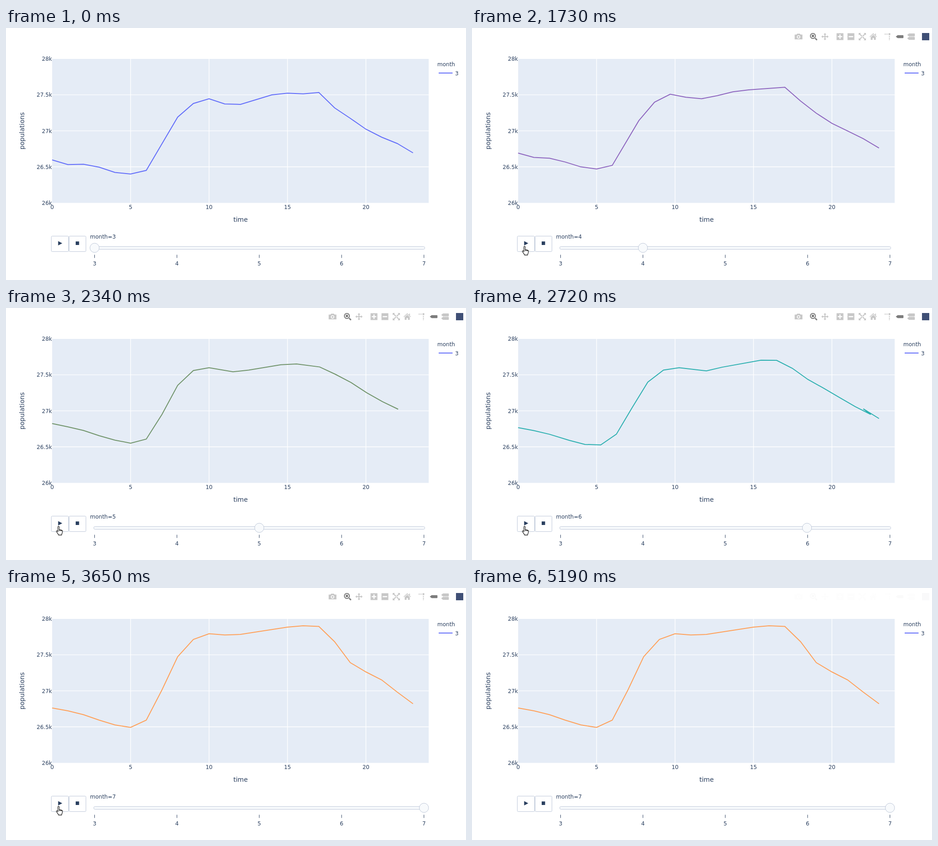
Write an HTML page that moves like this. It is 1010 px wide and 554 px high and loops after 6.43 s.

```html
<!DOCTYPE html>
<html lang="en">
<head>
<meta charset="utf-8">
<title>Populations by month</title>
<style>
  html, body { margin: 0; height: 100%; overflow: hidden; background: #fff; }
  svg { display: block; width: 1010px; height: 554px; }
  text { font: 12px "DejaVu Sans", sans-serif; fill: #2a3f5f; }
  .title { font-size: 14px; }
  .mid { text-anchor: middle; }
  .end { text-anchor: end; }
  .box { fill: #fff; stroke: #bec8d9; }
  .knob { fill: #f8fafc; stroke: #bec8d9; }
  .icon { fill: #c7c7c7; stroke: none; fill-rule: evenodd; }
  .icon.on { fill: #7c7c7c; }
</style>
</head>
<body>
<svg viewBox="0 0 1010 554">
  <rect x="101.3" y="68" width="826.8" height="316.5" fill="#e5ecf6"/>
  <g id="grid" stroke="#fff" stroke-width="1.4"></g>
  <path id="trace" fill="none" stroke-width="2" stroke-linejoin="miter" stroke-miterlimit="2"/>
  <g id="labels"></g>
  <text class="title mid" x="515" y="426">time</text>
  <text class="title mid" transform="translate(39.5 226) rotate(-90)">populations</text>
  <text x="947" y="83.5">month</text>
  <path d="M950 99h30.5" stroke="#636efa" stroke-width="2"/>
  <text x="986" y="104">3</text>

  <rect class="box" x="99.5" y="457.5" width="38" height="34" rx="2"/>
  <rect class="box" x="138.5" y="457.5" width="37" height="34" rx="2"/>
  <path d="M114.5 468.5l9 4.8-9 4.8zM153 469.3h7.5v7.7H153z" fill="#2a3f5f"/>

  <text id="current" x="184.5" y="463"></text>
  <rect class="knob" x="192.5" y="480.5" width="727" height="6" rx="3"/>
  <g id="steps"></g>
  <circle id="handle" class="knob" cy="483.3" r="10.2"/>

  <g id="modebar"></g>
  <path id="arrow" d="M0 0v16l3.8-3.6 2.6 6 2.3-1-2.6-5.8h5.4z" fill="#fff" stroke="#000"/>
  <path id="hand" d="M3.9 13V2.2a1.4 1.4 0 0 1 2.9 0V8.2l5.2 1.2q2 .5 2 2.6c0 3.8-1.6 4.6-1.9 8.1H5.3c-.3-2.4-2.4-4-4.5-7.1q-.6-1.9 1-2.2 1.2 0 2.1 2zM6.8 8v3.5m2.5-3v3m2.5-2.2v2.5"
    fill="#fff" stroke="#000" stroke-width="1.1" stroke-linejoin="round"/>
</svg>
<script>
const LOOP = 6430, FADE = 300;
const $ = id => document.getElementById(id);
const clamp = v => Math.min(1, Math.max(0, v));
const lerp = (a, b, k) => a + (b - a) * k;
const smooth = k => k * k * (3 - 2 * k);
const cubicInOut = k => k < .5 ? 4 * k ** 3 : 1 - 4 * (1 - k) ** 3;
const plotX = hour => 101.3 + 34.45 * hour;
const stepX = i => 194.5 + 180.8 * i;

// Heights in pixels, hour by hour; gaps are points left out of the simplified line.
const months = [
  { color: [99, 110, 250], ys: [290, 300.3, 299.6, 306, 317.5, 321, 313, , 196, 166, 155.5, 167,
    168, 157.5, 147, 143.3, 144.7, 141.7, 175.5, 198.5, 222.5, 240, 254, 274.5] },
  { color: [239, 85, 59], ys: [241, 249, 256.5, 269, 278, 285, 277, 221, 156.5, 123, 119, 127.5,
    129.3, 125.3, 119.5, , 106, 104.3, 127, 162, 180.5, 195.5, 219.7, 240] },
  { color: [0, 204, 150], ys: [265.6, 272.3, 280.7, 291.4, 301.6, 308.2, 298.3, 245.6, 182.4, 150.6, 142.4, ,
    151.9, 143, , , 124.2, 126.2, 150.9, 183.1, 197, 208.5, 228.9, 246.8] },
  { color: [171, 99, 250], ys: [255.4, 261.3, 269.1, , 289.8, 295.2, 281.2, 218.8, 145, 108.3, 97.1, 100.2,
    100, 94, 88.2, 83.7, 80.9, 84.6, 118.4, 163.5, 182.4, 198.6, 221.7, 243] },
  { color: [255, 161, 90], ys: [263.7, 270, 278.5, 290.5, 301, 306.5, 290.5, 224, 151, 113, 100.5, 103.3,
    102, , , 86, 83, 84.5, 118, 164, 184.5, 202, 229, 254.5] }
];
for (const m of months) {
  m.points = [];
  m.ys.forEach((y, hour) => m.points.push([plotX(hour), y])); // forEach skips the gaps
}
const starts = [1570, 2076, 2592, 3105];

// Static parts built by rule
const text = (cls, x, y, s) => `<text class="${cls}" x="${x}" y="${y}">${s}</text>`;
let grid = '', labels = '', steps = '';
for (let i = 0; i < 5; i++) {
  const x = plotX(5 * i), y = 384.5 - 79.2 * i;
  if (i) grid += `<path d="M${x} 68V384.5"/>`;
  if (i % 4) grid += `<path d="M101.3 ${y}H928.1"/>`;
  labels += text('mid', x, 398.3, 5 * i) + text('end', 101, y + 4.4, 26 + i / 2 + 'k');
  steps += `<path d="M${stepX(i)} 498.5v7" stroke="#2a3f5f"/>` + text('mid', stepX(i), 522.3, 3 + i);
}
$('grid').innerHTML = grid;
$('labels').innerHTML = labels;
$('steps').innerHTML = steps;

const arrowhead = 'M0-8l3 3.5h-2V0h-2v-4.5h-2z';
const corner = 'M-8-8h5l-1.7 1.7L0-1.6-1.6 0l-4.7-4.7L-8-3z';
const spin = (d, from = 0) => [0, 90, 180, 270].map(a => `<path d="${d}" transform="rotate(${a + from})"/>`).join('');
const tag = y => `<path d="M-8.5 ${y}l4-3.2H7q1.3 0 1.3 1.3v3.8q0 1.3-1.3 1.3H-4.5z"/>`;
const icons = [
  [717, '<path d="M-8.5-4.5h4l1.5-2h6l1.5 2h4V6h-17zM0-3.2a3.8 3.8 0 1 0 .01 0zM0-1.5a2.1 2.1 0 1 1-.01 0z"/>'],
  [750, '<path d="M-1.5-8a6.5 6.5 0 1 0 .01 0zm0 2a4.5 4.5 0 1 1-.01 0zM-4-4h5v5h-5zM2.5 4.5l2-2 4 4-2 2z"/>', 1],
  [775, spin(arrowhead) + '<path d="M-1-1h2v2h-2z"/>'],
  [808, '<path d="M-7.5-7.5h15v15h-15zM-1.2-5v3.8H-5v2.4h3.8V5h2.4V1.2H5v-2.4H1.2V-5z"/>'],
  [832, '<path d="M-7.5-7.5h15v15h-15zM-5-1.2v2.4H5v-2.4z"/>'],
  [857, spin(corner)],
  [881, '<path d="M0-7.5L8 0 7 1 0-5.5-7 1-8 0zM4-6.5h2v4l-2-2zM0-4l5.5 5v6h-4V3h-3v4h-4V1z"/>'],
  [912, '<path d="M-6-6.5h2.5v2H-6zm4 0h2.5v2H-2zM2.5-7.5h4v4h-4zM3.5-1.5h2V1h-2zm0 4h2V5h-2zm0 3.5h2v1.5h-2z"/>'],
  [939, tag(0), 1],
  [964, tag(-3.8) + tag(3.8)]
];
$('modebar').innerHTML = icons.map(([x, shape, on]) =>
  `<g class="icon ${on ? 'on' : ''}" transform="translate(${x} 19)">${shape}</g>`).join('') +
  '<rect x="988" y="11" width="16" height="16" fill="#3f4f75"/>';

// The chart redraws about 13 times a second while it plays.
const held = t => 1570 + 76.9 * Math.floor((t - 1564) / 76.9);

function drawChart(t) {
  const now = held(t), i = starts.filter(s => s <= now).length;
  const to = months[i], from = months[Math.max(0, i - 1)];
  const age = i ? now - starts[i - 1] : 500, k = clamp(age / 500);
  // Vertices pair up by index; unmatched ones appear at once in their final place.
  const points = k === 1 ? to.points : to.points.map((p, j) =>
    from.points[j] ? p.map((v, c) => lerp(from.points[j][c], v, k)) : p);
  $('trace').setAttribute('d', 'M' + points.join('L'));
  $('trace').setAttribute('stroke', `rgb(${to.color.map((c, j) => Math.round(lerp(from.color[j], c, k)))})`);
  $('current').textContent = 'month=' + (3 + i);
  $('handle').setAttribute('cx', lerp(stepX(Math.max(0, i - 1)), stepX(i), cubicInOut(clamp(age / 150))));
}

function drawPointer(t) {
  const leaving = t >= 4960, k = smooth(clamp((t - 80) / 400));
  const x = leaving ? 108.5 : lerp(107.5, 110, k), y = leaving ? 510 : lerp(500, 479, k);
  const visible = t >= 80 && t < 5035, overButton = !leaving && y < 491;
  for (const [id, shown] of [['arrow', !overButton], ['hand', overButton]]) {
    $(id).setAttribute('transform', `translate(${x} ${y})`);
    $(id).setAttribute('visibility', visible && shown ? 'visible' : 'hidden');
  }
  const fadeIn = t < 80 ? 0 : smooth(clamp((t - 60) / FADE));
  const fadeOut = leaving ? smooth(clamp((Math.min(t, 5190) - 4920) / FADE)) : 0;
  $('modebar').setAttribute('opacity', fadeIn - fadeOut);
}

function draw() {
  const t = performance.now() % LOOP;
  drawChart(t);
  drawPointer(t);
  requestAnimationFrame(draw);
}
draw();
</script>
</body>
</html>
```
